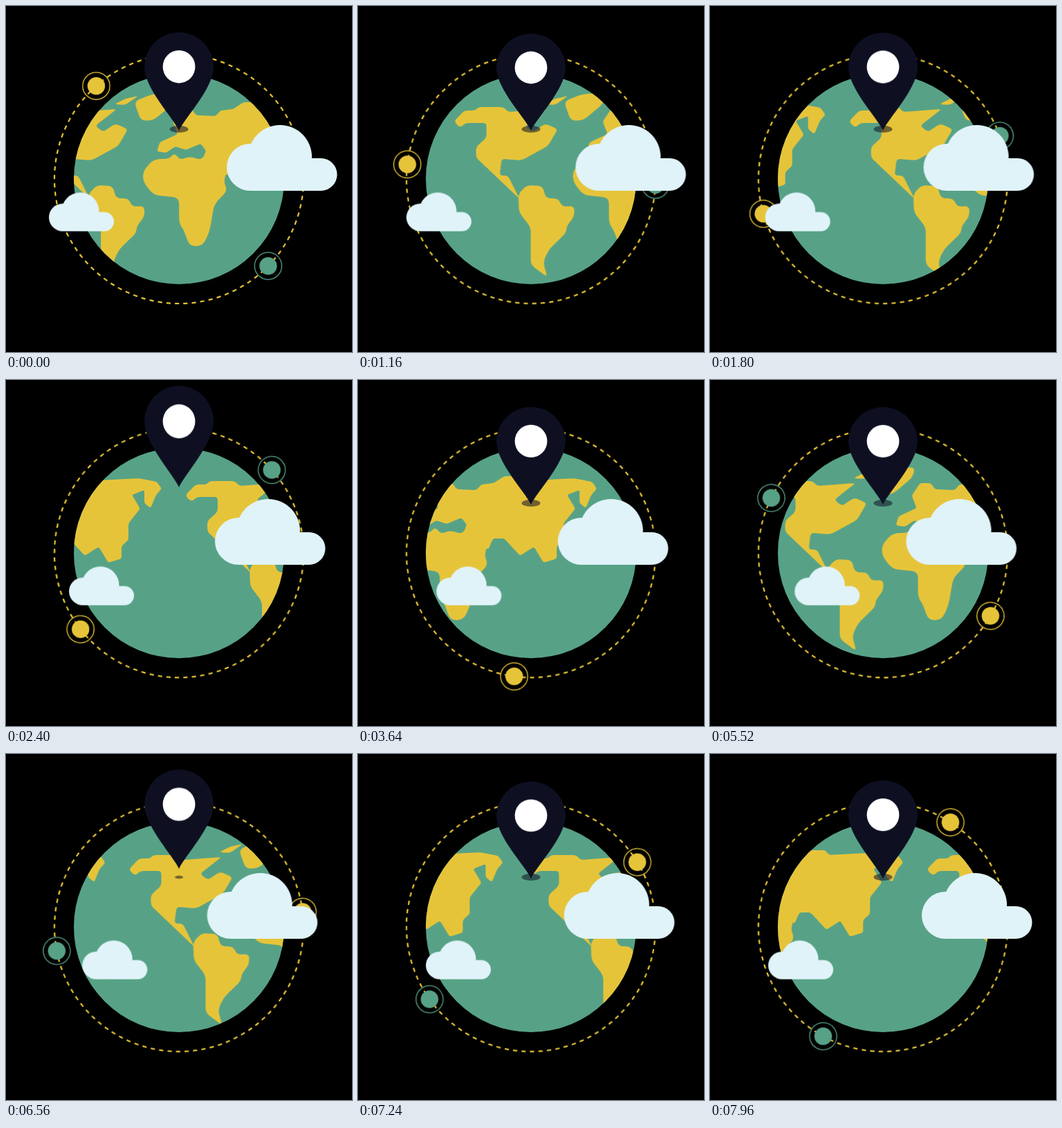
An HTML page that plays this animation: 500x500 px, repeating every 8 s.

```html
<!DOCTYPE html>
<html lang="en">
<head>
<meta charset="utf-8">
<title>Globe</title>
<style>
  html, body { margin: 0; width: 100%; height: 100%; overflow: hidden; background: #000; }
  svg { display: block; width: 100%; height: 100%; }

  .land { fill: #e6c43a; animation: scroll 8s linear infinite; }
  .orbit { fill: none; stroke: #e9c636; stroke-width: 1.3; transform-origin: 250px 250px; animation: orbit 8s linear infinite; }
  .cloud { fill: #e0f3f9; animation: drift 8s infinite; }
  .pin { transform-origin: 250px 180px; animation: hop 2s linear infinite; }
  .shadow { fill: #0f1124; opacity: .55; transform-origin: 250px 178px; animation: shade 2s linear infinite; }

  @keyframes scroll { to { transform: translateX(776px); } }
  @keyframes orbit { to { transform: rotate(-287deg); } }

  /* a sine swing of 10 s, cut after 8 s */
  @keyframes drift {
    0% { transform: translateX(0); animation-timing-function: cubic-bezier(.364, 0, .636, 1); }
    62.5% { transform: translateX(var(--dx)); animation-timing-function: cubic-bezier(.367, 0, .678, .558); }
    100% { transform: translateX(calc(var(--dx) * .3455)); }
  }

  /* leap, land, small rebound, rest */
  @keyframes hop {
    0%, 10% { transform: translateY(0) scaleY(1.014); }
    22.5% { transform: translateY(-31px) scaleY(1.057); animation-timing-function: ease-in-out; }
    33% { transform: translateY(0) scaleY(1); animation-timing-function: ease-out; }
    39% { transform: translateY(-6px) scaleY(1); animation-timing-function: ease-in; }
    47%, 58% { transform: translateY(0) scaleY(1); }
    100% { transform: translateY(0) scaleY(1.014); }
  }
  @keyframes shade {
    0%, 10%, 33%, 47%, 100% { transform: scale(1); }
    20%, 24% { transform: scale(0); }
    39% { transform: scale(.8); }
  }
</style>
</head>
<body>
<svg viewBox="0 0 500 500">
  <defs>
    <clipPath id="disc"><circle cx="250" cy="250" r="152"/></clipPath>
    <g id="map"></g>
    <g id="puff">
      <rect x="319" y="199" width="110" height="68" rx="34"/>
      <circle cx="396" cy="218" r="46"/>
      <rect x="360" y="220" width="118.5" height="47" rx="23.5"/>
    </g>
  </defs>

  <g class="orbit">
    <circle cx="250" cy="250" r="180" stroke-width="2.2" pathLength="184" stroke-dasharray="1 1"/>
    <circle cx="130.5" cy="115.4" r="19.6"/>
    <circle cx="130.5" cy="115.4" r="12.7" fill="#e6c43a" stroke="none"/>
    <circle cx="378.8" cy="375.7" r="19.6" stroke="#57a286"/>
    <circle cx="378.8" cy="375.7" r="12.7" fill="#57a286" stroke="none"/>
  </g>

  <circle cx="250" cy="250" r="152" fill="#57a286"/>
  <g clip-path="url(#disc)">
    <g class="land">
      <use href="#map"/>
      <use href="#map" x="-485"/>
      <use href="#map" x="-970"/>
    </g>
  </g>

  <ellipse class="shadow" cx="250" cy="178" rx="13.5" ry="5"/>
  <g class="pin">
    <path d="M250 180C242 162 201 121 200 90A50 50 0 0 1 300 90C299 121 258 162 250 180Z" fill="#0e1022"/>
    <circle cx="250" cy="89" r="23.4" fill="#fff"/>
  </g>

  <g class="cloud" style="--dx: -36.5px"><use href="#puff"/></g>
  <g class="cloud" style="--dx: 62px"><use href="#puff" transform="translate(-125.9 168.2) scale(.589)"/></g>
</svg>
<script>
  // Key corners of a coast; every corner is softened by the same rule.
  function addLand(radius, corners) {
    const points = corners.split(' ').map(pair => pair.split(',').map(Number));
    const n = points.length;
    const toward = ([ax, ay], [bx, by]) => {
      const length = Math.hypot(bx - ax, by - ay);
      const k = Math.min(radius / length, .5);
      return [ax + (bx - ax) * k, ay + (by - ay) * k];
    };
    const d = points.map((p, i) =>
      `${toward(p, points[(i + n - 1) % n])} Q${p} ${toward(p, points[(i + 1) % n])}`);
    const path = document.createElementNS('http://www.w3.org/2000/svg', 'path');
    path.setAttribute('d', `M${d.join('L')}Z`);
    document.getElementById('map').append(path);
  }

  // North America, Arctic island, Greenland
  addLand(5, '26,167 41,151 57,151 61,146 98,146 104,153 160,149 129,173 140,182 158,170 176,178 ' +
    '162,202 124,223 95,221 92,245 104,245 121,279 58,219 58,204 73,190 73,169 43,169 35,176');
  addLand(4, '157,142 172,134 191,130 172,143');
  addLand(8, '185,138 212,127 246,126 242,141 213,165 195,166');

  // South America
  addLand(7, '119,272 131,259 154,260 159,278 177,278 182,290 200,289 200,304 189,318 188,328 ' +
    '163,352 155,370 161,392 137,374 137,320 120,298');

  // Africa, Eurasia
  addLand(9, '198,238 214,221 236,221 243,212 252,223 264,217 284,223 290,205 330,215 314,252 ' +
    '320,267 301,286 294,326 284,347 265,347 257,324 250,314 250,277 213,273 198,254');
  addLand(3, '241,167 253,149 268,149 275,158 303,159 310,151 328,149 343,139 364,139 370,146 ' +
    '443,142 470,147 477,157 469,166 461,185 452,178 452,159 434,166 446,186 429,207 429,231 419,240 ' +
    '419,258 400,264 386,241 366,254 343,229 327,229 320,245 286,218 289,209 281,199 260,208 ' +
    '245,203 231,212 218,210 222,197 248,185');
</script>
</body>
</html>
```
